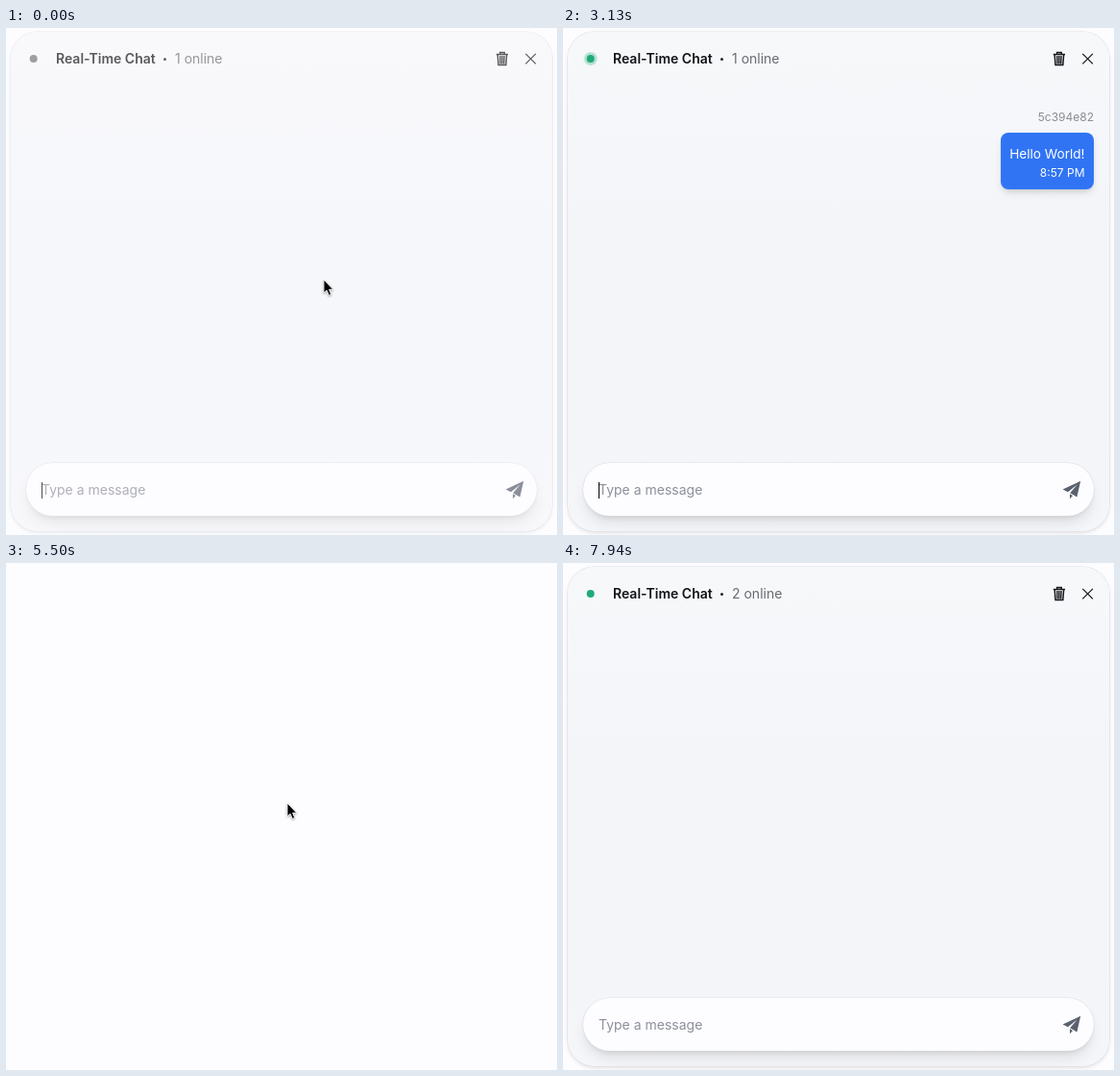
Animation of 574 by 528 pixels, one loop 8 s. Source, as an HTML page:

```html
<!DOCTYPE html>
<html lang="en">
<head>
<meta charset="utf-8">
<title>Real-Time Chat</title>
<style>
html, body { margin: 0; width: 100%; height: 100%; overflow: hidden; background: #fdfcff; }
body { position: relative; font: 14px/20px Inter, "Liberation Sans", sans-serif; color: #111317; }
body * { position: absolute; box-sizing: border-box; white-space: pre; }
svg * { transform-box: fill-box; }

/* every scene animation shares one 8 s clock: 1% = 80 ms */
.chat, .dot, .online::before, .hint, .text::before, .caret, .send, .msg, .open,
.arrow, .beam, .first, .second { animation: 8s step-end infinite; }

.chat { inset: 0; animation-name: chat; animation-timing-function: linear; }
.card {
  left: 5px; top: 4px; width: 564px; height: 520px; border-radius: 28px;
  background: linear-gradient(#f6f8fa, #f3f5f9 40%, #f3f5f9 80%, #f5f6f9);
  box-shadow: 0 0 0 .6px #dfe0e4, 0 2px 4px #0000001c;
}
.title { left: 52px; top: 22px; font-weight: 600; }
.sep { left: 163.5px; top: 30.5px; width: 3px; height: 3px; border-radius: 50%; background: #222429; }
.online { left: 176px; top: 22px; color: #6a6b70; }
.online::before { content: "1 online"; animation-name: online; }
.box {
  left: 21px; top: 453px; width: 532px; height: 55px; border-radius: 28px; background: #fdfcff;
  box-shadow: 0 0 0 .6px #dcdde2, 0 10px 15px -3px #0000001a, 0 4px 6px -4px #0000002a;
}
.hint, .text { left: 37px; top: 471px; }
.hint { color: #8b909b; animation-name: hint; }
.text::before { content: ""; animation-name: type; }
.caret {
  position: static; display: inline-block; width: 1.3px; height: 17px; margin-right: -1.3px;
  vertical-align: -4px; background: #000; animation-name: caret;
}
.msg { inset: 0; visibility: hidden; animation-name: msg; }
.user { right: 21px; top: 84px; font-size: 12px; line-height: 18px; color: #8b8c92; }
.bubble {
  left: 456px; top: 109px; width: 97px; height: 59px; border-radius: 8px; background: #3074f4;
  box-shadow: 0 5px 8px -2px #00000026, 0 2px 4px -2px #0000001a; color: #fff;
}
.bubble b { right: 9.5px; top: 12px; font-weight: 400; font-size: 13.6px; }
.bubble i { right: 9.5px; top: 33px; font-style: normal; font-size: 12px; line-height: 18px; }
.icons { inset: 0; }
.dot { fill: #1faa78; animation-name: dot; }
.ping { fill: #1faa78; transform-origin: center; animation: ping 1s infinite, fade 1s infinite; }
.first { animation-name: first; }
.first .ping { animation-delay: -.31s; }
.second { visibility: hidden; animation-name: second; }
.second .ping { animation-delay: -.81s; }
.send { fill: #5a616e; animation-name: send; }

.open {
  left: 238px; top: 245px; width: 98px; height: 39px; border-radius: 6px; background: #1e56e5;
  color: #fff; font-weight: 600; line-height: 39px; text-align: center; visibility: hidden;
  animation-name: open;
}
.arrow, .beam { left: 0; top: 0; overflow: visible; }
.arrow { animation-name: path, arrow; animation-timing-function: ease-in-out, step-end; filter: drop-shadow(0 1px 1px #0005); }
.beam { left: 193px; top: 477px; visibility: hidden; animation-name: beam; }

@keyframes chat {
  0%, .75% { opacity: .7 }
  4.75%, 56.24% { opacity: 1 }
  56.25%, 69.5% { opacity: 0 }
  72.5%, 75% { opacity: .7 }
  78.1%, 100% { opacity: 1 }
}
@keyframes dot {
  0% { fill: #75757b } .75% { fill: #1faa78 } 56.25% { fill: #75757b } 75%, 100% { fill: #1faa78 }
}
@keyframes ping { 0% { transform: none; animation-timing-function: cubic-bezier(0,0,.2,1) } 75%, 100% { transform: scale(1.8) } }
@keyframes fade { 0% { opacity: .75; animation-timing-function: linear } 75%, 100% { opacity: 0 } }
@keyframes first { 0% { visibility: hidden } .75% { visibility: visible } 56.25%, 100% { visibility: hidden } }
@keyframes second { 0% { visibility: hidden } 75%, 100% { visibility: visible } }
@keyframes online { 0% { content: "1 online" } 56.25%, 100% { content: "2 online" } }
@keyframes hint { 0% { visibility: visible } 7% { visibility: hidden } 33.625%, 100% { visibility: visible } }
@keyframes send { 0% { fill: #5a616e } 7% { fill: #3270e4 } 33.625%, 100% { fill: #5a616e } }
@keyframes type {
  0% { content: "" }
  7% { content: "H" }
  10.125% { content: "He" }
  13.25% { content: "Hel" }
  14.875% { content: "Hell" }
  17.25% { content: "Hello" }
  19.5% { content: "Hello " }
  21.875% { content: "Hello W" }
  23.5% { content: "Hello Wo" }
  25% { content: "Hello Wor" }
  26.5% { content: "Hello Worl" }
  28.125% { content: "Hello World" }
  30.5% { content: "Hello World!" }
  33.625%, 100% { content: "" }
}
@keyframes caret {
  0% { opacity: 1 } 39.875% { opacity: 0 } 46.125% { opacity: 1 } 52.375% { opacity: 0 }
  89.875% { opacity: 1 } 96.125%, 100% { opacity: 0 }
}
@keyframes msg { 0% { visibility: hidden } 34.375% { visibility: visible } 56.25%, 100% { visibility: hidden } }
@keyframes open { 0% { visibility: hidden } 56.25% { visibility: visible } 66.375%, 100% { visibility: hidden } }
@keyframes path {
  0%, 47% { transform: translate(331px, 262px) }
  55.5%, 57% { transform: translate(329px, 186px) }
  65%, 69% { transform: translate(293px, 250px) }
  78%, 100% { transform: translate(195px, 468px) }
}
@keyframes arrow {
  0% { visibility: visible } 7% { visibility: hidden } 46.125% { visibility: visible }
  78.125%, 100% { visibility: hidden }
}
@keyframes beam { 0% { visibility: hidden } 78.125% { visibility: visible } 93%, 100% { visibility: hidden } }
</style>
</head>
<body>
<div class="chat">
  <div class="card"></div>
  <div class="title">Real-Time Chat</div>
  <div class="sep"></div>
  <div class="online"></div>
  <div class="msg">
    <div class="user">5c394e82</div>
    <div class="bubble"><b>Hello World!</b><i>8:57 PM</i></div>
  </div>
  <div class="box"></div>
  <div class="hint">Type a message</div>
  <div class="text"><span class="caret"></span></div>
  <svg class="icons" width="574" height="528">
    <g class="first"><circle class="ping" cx="28.7" cy="32" r="4"/></g>
    <g class="second"><circle class="ping" cx="28.7" cy="32" r="4"/></g>
    <circle class="dot" cx="28.7" cy="32" r="4"/>
    <g fill="none" stroke="#15171b">
      <path stroke-width="1.5" d="M510.8 27.6h12.2M514.6 27v-1.4h4.6V27M512.2 28l.8 10.4h7.8l.8-10.4"/>
      <path stroke-width="1.4" d="M514.8 29l.3 8.5M516.9 29v8.5M519 29l-.3 8.5"/>
      <path stroke-width="1.2" d="M541.3 26.8l10.6 10.6M551.9 26.8l-10.6 10.6"/>
    </g>
    <path class="send" d="M539.2 471.8 520.6 480.6 526 483.2 535.8 475.4 528.2 484.2 535.4 488.4ZM528 485.3V490.2L531 487Z"/>
  </svg>
</div>
<div class="open">Open Chat</div>
<svg class="arrow" width="12" height="18">
  <path d="M0 0V14L3.1 11.2 5.4 16.4 7.8 15.4 5.6 10.3H9.8Z" stroke="#fff" stroke-width=".9"/>
</svg>
<svg class="beam" width="10" height="20">
  <path d="M-4-8.2Q0-8.2 0-6 0-8.2 4-8.2M0-6V6M-4 8.2Q0 8.2 0 6 0 8.2 4 8.2M-2 1.8H2" fill="none" stroke="#111" stroke-width="1.3"/>
</svg>
</body>
</html>
```
